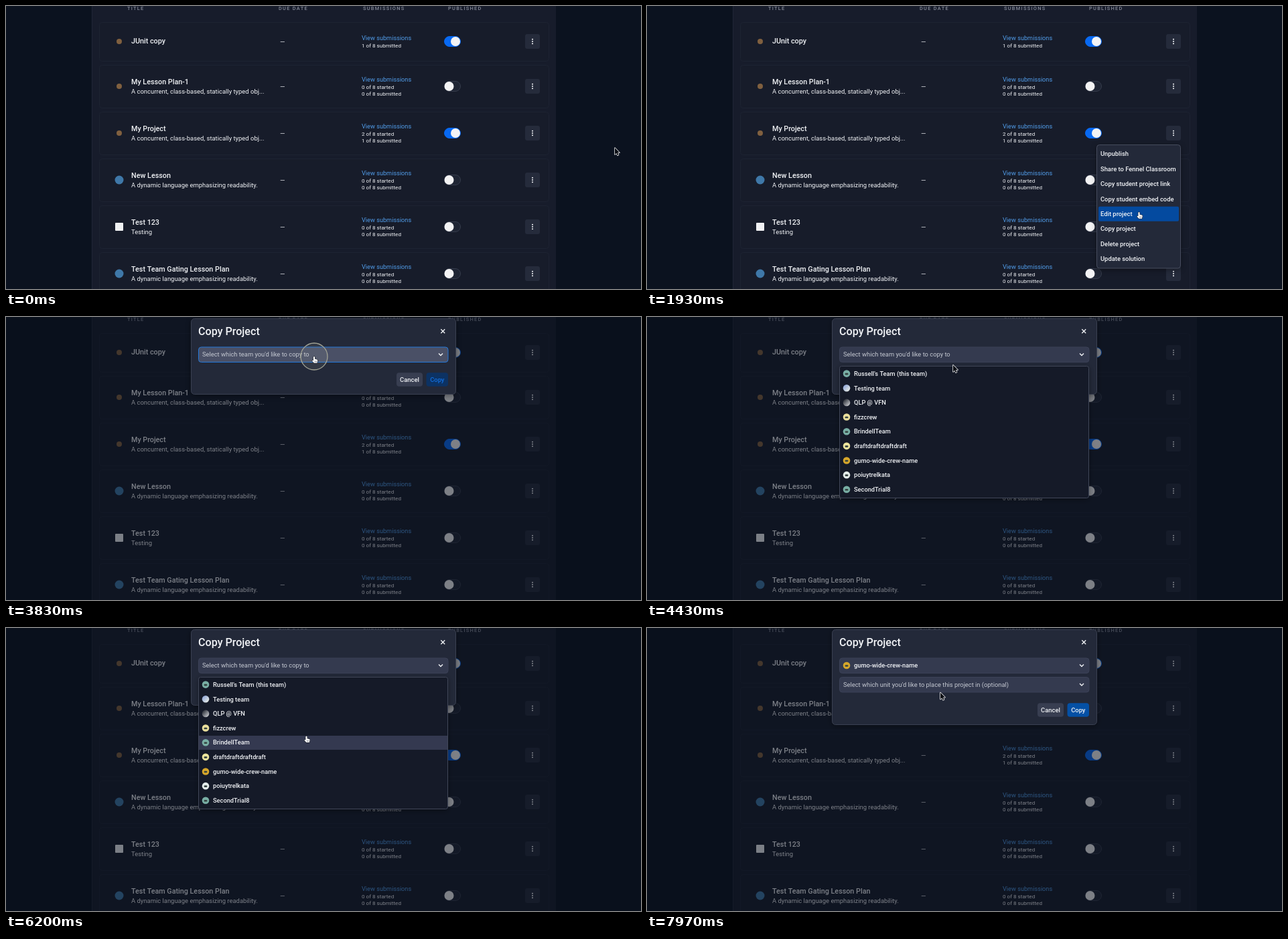
An HTML page with a canvas that plays this animation: 948 px wide and 423 px high, repeating every 8 s.

```html
<!DOCTYPE html>
<html lang="en">
<head>
<meta charset="utf-8">
<title>Copy a project</title>
<style>
html, body { margin: 0; width: 100%; height: 100%; overflow: hidden; background: #0b121f; }
canvas { display: block; width: 948px; height: 423px; }
</style>
</head>
<body>
<canvas id="stage"></canvas>
<script>
const W = 948, H = 423, LOOP = 8000;
const canvas = document.getElementById('stage');
const ctx = canvas.getContext('2d');
const dpr = window.devicePixelRatio || 1;
canvas.width = W * dpr;
canvas.height = H * dpr;

const WHITE = '#f1f3f6';
const SURFACE = '#232939';
const FIELD = '#343a4f';

// Moments at which the interface changes, in ms
const MENU_OPEN = 880, MODAL_OPEN = 2860, FOCUS = 3710, LIST_OPEN = 3960, PICK = 7290;
const CLICKS = [800, 2740, FOCUS, 7180];

const JAVA = 'A concurrent, class-based, statically typed obj...';
const PYTHON = 'A dynamic language emphasizing readability.';
const NONE = ['0 of 8 started', '0 of 8 submitted'];
const ROWS = [
  { y: 53, icon: 'java', title: 'JUnit copy', counts: ['1 of 8 submitted'], on: true },
  { y: 120, icon: 'java', title: 'My Lesson Plan-1', desc: JAVA, counts: NONE },
  { y: 190, icon: 'java', title: 'My Project', desc: JAVA, counts: ['2 of 8 started', '1 of 8 submitted'], on: true },
  { y: 260, icon: 'python', title: 'New Lesson', desc: PYTHON, counts: NONE },
  { y: 330, icon: 'shell', title: 'Test 123', desc: 'Testing', counts: NONE },
  { y: 400, icon: 'python', title: 'Test Team Gating Lesson Plan', desc: PYTHON, counts: NONE }
];
const HEADERS = [['TITLE', 181], ['DUE DATE', 407], ['SUBMISSIONS', 533], ['PUBLISHED', 660]];
const MENU = ['Unpublish', 'Share to Fennel Classroom', 'Copy student project link',
  'Copy student embed code', 'Edit project', 'Copy project', 'Delete project', 'Update solution'];
const TEAMS = [
  ["Russell's Team (this team)", '#78aea4'],
  ['Testing team', '#8fa6d8', '#e8ece6'],
  ['QLP @ VFN', '#2b2f38', '#c4c6ca'],
  ['fizzcrew', '#eadf9c'],
  ['BrindellTeam', '#78aea4'],
  ['draftdraftdraftdraft', '#ece49c'],
  ['gumo-wide-crew-name', '#d6a62a'],
  ['poiuytrelkata', '#e4ecea'],
  ['SecondTrial8', '#78aea4']
];
const PICKED = TEAMS[6];

// Pointer stops: time, x, y
const PATH = [
  [0, 909, 212], [130, 909, 212], [730, 789.5, 190], [1260, 789.5, 190],
  [1800, 734.5, 308], [2200, 734.5, 308], [2540, 736, 330], [2900, 736, 330],
  [3600, 460, 59], [4150, 460, 59], [4750, 453.5, 87.5], [5300, 453.5, 87.5],
  [6000, 449, 150], [6750, 446, 214], [7350, 446, 214], [7850, 438, 96.5], [LOOP, 438, 96.5]
];

const HAND = new Path2D('M-1.3 1Q0-.8 1.3 1V4.5L5 5.4Q6.3 5.8 6.1 7.3L5.3 11.5H-.2L-3.4 7.8Q-3.6 6-1.3 7.2Z');
const ARROW = new Path2D('M0 0V10L2.3 7.9L3.8 11.3L5.5 10.5L4 7.2H7Z');

const ease = p => p * p * (3 - 2 * p);

function pointerAt(t) {
  let i = 1;
  while (i < PATH.length - 1 && PATH[i][0] < t) i++;
  const [t0, x0, y0] = PATH[i - 1], [t1, x1, y1] = PATH[i];
  const p = ease((t - t0) / (t1 - t0));
  return { x: x0 + (x1 - x0) * p, y: y0 + (y1 - y0) * p };
}

const inside = (p, x, y, w, h) => p.x >= x && p.x < x + w && p.y >= y && p.y < y + h;

function box(x, y, w, h, r, fill, stroke) {
  ctx.beginPath();
  ctx.roundRect(x, y, w, h, r);
  if (fill) { ctx.fillStyle = fill; ctx.fill(); }
  if (stroke) { ctx.strokeStyle = stroke; ctx.lineWidth = 1; ctx.stroke(); }
}

function disc(x, y, r, fill) {
  ctx.beginPath();
  ctx.arc(x, y, r, 0, Math.PI * 2);
  ctx.fillStyle = fill;
  ctx.fill();
}

function line(points, color, width) {
  ctx.beginPath();
  points.forEach(([x, y], i) => i ? ctx.lineTo(x, y) : ctx.moveTo(x, y));
  ctx.strokeStyle = color;
  ctx.lineWidth = width;
  ctx.stroke();
}

// y is the middle of the capitals
function label(str, x, y, size, { color = WHITE, weight = 400, align = 'left', spacing = 0 } = {}) {
  ctx.font = `${weight} ${size}px Roboto, sans-serif`;
  ctx.letterSpacing = spacing + 'px';
  ctx.textAlign = align;
  ctx.fillStyle = color;
  ctx.fillText(str, x, y + size * 0.355);
}

function rowIcon(kind, y) {
  if (kind === 'java') disc(169, y, 4, '#80603f');
  else if (kind === 'python') disc(169, y, 6.5, '#3f78a8');
  else box(163, y - 6, 12, 12, 1, '#f0f1f3');
}

function toggle(y, on) {
  box(654.5, y - 7.5, 24, 15, 7.5, on ? '#0869f2' : '#1f2534', on ? '#0869f2' : '#353b4b');
  disc(on ? 671 : 661.5, y, 7, '#f3f3f4');
}

function kebab(y, hover) {
  box(775, y - 11, 22, 22, 3, hover ? '#3a4057' : '#252b3b');
  for (const d of [-3.3, 0, 3.3]) disc(786, y + d, 1.05, WHITE);
}

function drawRow(row, pointer, live) {
  const { y, desc, counts } = row;
  const top = desc ? y - 32 : 24;
  box(139.5, top + 0.5, 671, desc ? 64 : 58, 4, '#171c2a', '#1d2332');
  rowIcon(row.icon, y);
  label(row.title, 187, desc ? y - 7 : y - 1, 10.75, { weight: 500 });
  if (desc) label(desc, 187, y + 8, 9.45);
  label('—', 409, y + 0.5, 9.6);
  label('View submissions', 531, desc ? y - 10 : y - 5, 9.2, { color: '#519ce8' });
  counts.forEach((c, i) => label(c, 531, desc ? y + 1 + i * 10.2 : y + 6, 8.1));
  toggle(y, row.on);
  kebab(y, live && inside(pointer, 775, y - 11, 22, 22));
}

function drawPage(pointer, live) {
  ctx.fillStyle = '#0b121f';
  ctx.fillRect(0, 0, W, H);
  ctx.fillStyle = '#171c2b';
  ctx.fillRect(128, 0, 693, H);
  ctx.fillStyle = '#202636';
  ctx.fillRect(128, 0, 1, H);
  for (const [str, x] of HEADERS)
    label(str, x, 3, 7.4, { color: '#858a98', weight: 500, spacing: 1.29 });
  for (const row of ROWS) drawRow(row, pointer, live);
}

function shadowBox(x, y, w, h, r, fill, stroke) {
  ctx.save();
  ctx.shadowColor = 'rgba(0,0,0,.4)';
  ctx.shadowBlur = 8 * dpr;
  ctx.shadowOffsetY = 2 * dpr;
  box(x, y, w, h, r, fill);
  ctx.restore();
  box(x, y, w, h, r, null, stroke);
}

function drawMenu(pointer) {
  shadowBox(671.5, 207.5, 125, 184.5, 4, SURFACE, '#474d5e');
  const step = 22.43;
  MENU.forEach((item, i) => {
    const y = 221 + i * step;
    if (inside(pointer, 674, y - step / 2, 120, step)) box(674, y - 11, 120, 22, 2, '#044a9f');
    label(item, 677, y, 9.4, { weight: 500 });
  });
}

function avatar(x, y, [, color, light]) {
  if (light) {
    const g = ctx.createLinearGradient(x - 4, y - 4, x + 4, y + 4);
    g.addColorStop(0, color);
    g.addColorStop(1, light);
    disc(x, y, 5.3, g);
    return;
  }
  disc(x, y, 5.3, color);
  box(x - 2.4, y - 0.8, 4.8, 2.6, 1.2, '#33413f');
}

function select(y, text, { team, hover, focus } = {}) {
  box(287.5, y - 11, 372.5, 22.5, 4, hover ? '#4a5066' : FIELD, focus ? '#2377d8' : '#3b4157');
  if (team) avatar(298, y, team);
  if (team) label(text, 309, y, 9.25, { weight: 500 });
  else label(text, 293, y, 9.35, { color: '#c5c9d2' });
  line([[646, y - 1.5], [649, y + 1.5], [652, y - 1.5]], WHITE, 1.4);
}

function drawList(pointer) {
  const step = 21.65;
  shadowBox(287.5, 73.5, 372, 197, 3, '#151a28', '#414759');
  TEAMS.forEach((team, i) => {
    const y = 84.6 + i * step;
    if (inside(pointer, 288, y - step / 2, 371, step)) {
      ctx.fillStyle = '#343950';
      ctx.fillRect(288, Math.round(y - 10.7), 371, 21);
    }
    avatar(298, y, team);
    label(team[0], 309, y, 9.25, { weight: 500 });
  });
}

function drawModal(t, pointer) {
  const picked = t >= PICK;
  const open = t >= LIST_OPEN && !picked;
  const bottom = picked ? 144 : 115;

  ctx.fillStyle = 'rgba(9,15,26,.5)';
  ctx.fillRect(0, 0, W, H);
  shadowBox(276.5, 2.5, 395, bottom - 2, 5, SURFACE, '#3b4152');
  label('Copy Project', 287, 21.5, 16.1, { weight: 500 });
  line([[649.3, 18.3], [655.2, 24.2]], WHITE, 1.3);
  line([[655.2, 18.3], [649.3, 24.2]], WHITE, 1.3);

  const hover = inside(pointer, 287, 45, 373, 23);
  if (picked) {
    select(56, PICKED[0], { team: PICKED, hover });
    select(84.5, "Select which unit you'd like to place this project in (optional)",
      { hover: inside(pointer, 287, 73, 373, 23) });
  } else {
    select(56, "Select which team you'd like to copy to", { hover, focus: t >= FOCUS && !open });
  }

  const y = bottom - 21.5;
  box(583, y - 10.3, 39, 20.6, 4, '#383e51');
  label('Cancel', 602.5, y, 9.4, { weight: 500, align: 'center' });
  box(627.5, y - 10.3, 32.5, 20.6, 4, picked ? '#0450a5' : '#0c3263');
  label('Copy', 643.8, y, 9.4, { color: picked ? WHITE : '#126fdf', weight: 500, align: 'center' });
  if (open) drawList(pointer);
}

function isClickable(t, p) {
  if (t < MODAL_OPEN) {
    const onMenu = t >= MENU_OPEN && inside(p, 672, 208, 124, 184);
    return onMenu || ROWS.some(r => inside(p, 775, r.y - 11, 22, 22));
  }
  if (inside(p, 287, 45, 373, 23)) return true;
  if (t < LIST_OPEN) return false;
  return inside(p, 287, 73, 373, t < PICK ? 197 : 23);
}

function drawRings(t, p) {
  for (const start of CLICKS) {
    const age = (t - start) / 290;
    if (age < 0 || age >= 1) continue;
    ctx.save();
    ctx.globalAlpha = Math.min(1, (1 - age) * 1.8);
    ctx.beginPath();
    ctx.arc(p.x, p.y, 15 + 5 * Math.min(1, age * 2.4), 0, Math.PI * 2);
    ctx.fillStyle = 'rgba(190,190,180,.1)';
    ctx.fill();
    ctx.strokeStyle = '#a3a596';
    ctx.lineWidth = 1.3;
    ctx.stroke();
    ctx.restore();
  }
}

function drawPointer(t, p) {
  const hand = isClickable(t, p);
  const shape = hand ? HAND : ARROW;
  ctx.save();
  ctx.translate(p.x, p.y);
  if (hand) ctx.scale(0.85, 0.85);
  ctx.lineJoin = 'round';
  ctx.lineWidth = hand ? 1.2 : 1.5;
  ctx.strokeStyle = hand ? '#11151d' : '#f4f4f4';
  ctx.fillStyle = hand ? '#fff' : '#0a0d14';
  ctx.stroke(shape);
  ctx.fill(shape);
  if (hand) for (const x of [1.2, 2.7, 4.2]) line([[x, 7.8], [x, 10]], '#3a3f49', 0.6);
  ctx.restore();
}

function draw(t) {
  const pointer = pointerAt(t);
  const modal = t >= MODAL_OPEN;
  ctx.setTransform(dpr, 0, 0, dpr, 0, 0);
  drawPage(pointer, !modal);
  if (modal) drawModal(t, pointer);
  else if (t >= MENU_OPEN) drawMenu(pointer);
  drawRings(t, pointer);
  drawPointer(t, pointer);
}

const begin = performance.now();
function frame() {
  draw((performance.now() - begin) % LOOP);
  requestAnimationFrame(frame);
}
frame();
</script>
</body>
</html>
```
